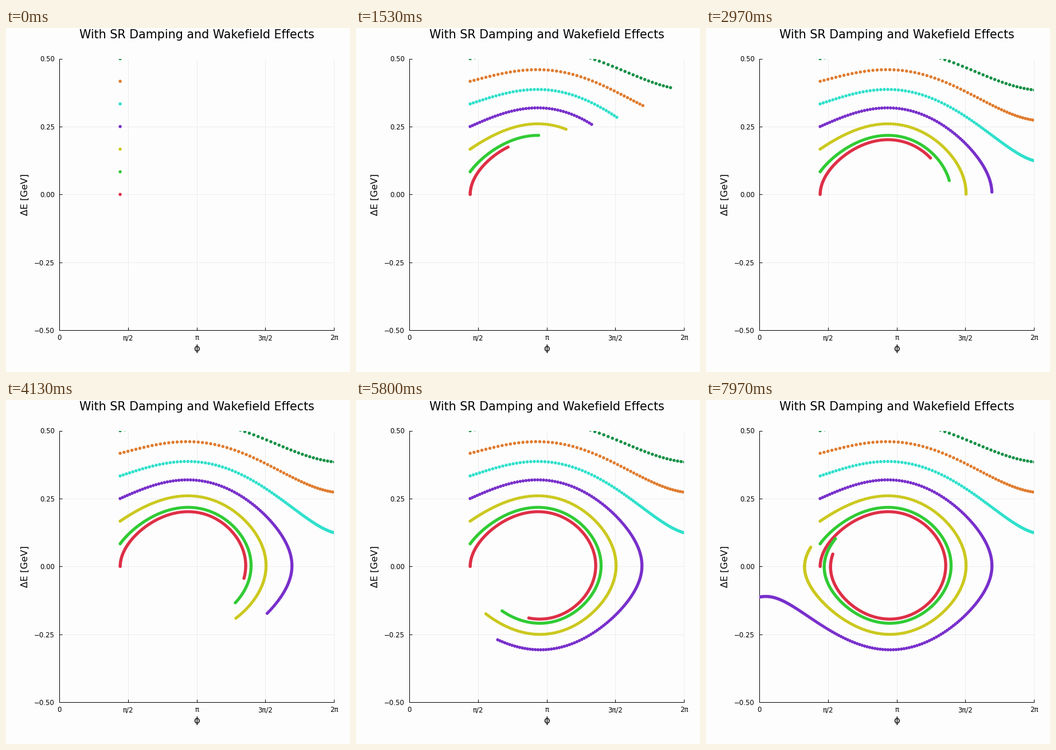
These frames come from a looping animation (600x600 px, 8 s). A matplotlib script:

```python
import numpy as np
import matplotlib.pyplot as plt
from matplotlib.animation import FuncAnimation

SIZE, DPI = 600, 100
FRAMES, LOOP_MS = 240, 8000
PAPER, INK, GRID = "#fdfdfd", "#000000", "#dedeea"
COLORS = ["#de2f46", "#30cb34", "#cbc81e", "#782fcb", "#2fe0cb", "#e07c2f", "#159046"]

# Ring: energies in GeV, phases in rad
E_START, E_GAIN = 4.0, 0.0017
VOLTAGE, SIN_S = 0.00505, 0.178
SLIP = 0.2113 * E_START
DAMPING = 0.00097
PHI_START = 1.391


def track(turns):
    """Phase and energy offset of every particle, turn by turn."""
    energy = E_START
    de = np.linspace(0, 0.5, len(COLORS))
    phi = np.full(len(COLORS), PHI_START)
    path = [np.column_stack([phi, de])]
    for _ in range(turns - 1):
        de = (de + VOLTAGE * (np.sin(phi) - SIN_S)) * (1 - DAMPING)
        energy += E_GAIN
        phi = phi + SLIP / energy * de
        path.append(np.column_stack([phi, de]))
    return np.concatenate(path)


def px(n):
    """Pixels to points."""
    return n * 72 / DPI


path = track(FRAMES)

plt.rcParams["font.family"] = "DejaVu Sans"
fig = plt.figure(figsize=(SIZE / DPI, SIZE / DPI), dpi=DPI, facecolor=PAPER)
ax = fig.add_axes([93 / SIZE, 73 / SIZE, 479.3 / SIZE, 473.5 / SIZE], facecolor=PAPER)
ax.set(xlim=(0, 2 * np.pi), ylim=(-0.5, 0.5))
ax.spines[["top", "right"]].set_visible(False)
ax.spines[["left", "bottom"]].set_linewidth(px(1))

ax.set_xticks(np.arange(5) * np.pi / 2, ["0", "π/2", "π", "3π/2", "2π"])
ax.set_yticks(np.arange(-2, 3) / 4, ["−0.50", "−0.25", "0.00", "0.25", "0.50"])
ax.tick_params(direction="in", length=px(5), width=px(1), labelsize=px(11.8))
ax.tick_params(axis="x", pad=px(7))
ax.tick_params(axis="y", pad=px(8))

grid = dict(color=GRID, lw=px(1), ls=(0, (1, 1)), zorder=0.5, clip_on=False)
for k in range(1, 5):
    ax.axvline(k * np.pi / 2, **grid)
for k in (-1, 0, 1):
    ax.axhline(k / 4, **grid)


def label(x, y, text, size, **kw):
    fig.text(x / SIZE, 1 - y / SIZE, text, fontsize=px(size), color=INK, ha="center", **kw)


label(332.7, 18, "With SR Damping and Wakefield Effects", 20.7, va="baseline")
label(332.7, 564, "ϕ", 16.3, va="baseline")
label(33, 290.5, "ΔE [GeV]", 16.3, va="center", rotation=90)

dots = ax.scatter([], [], s=px(5.5) ** 2, linewidths=0, zorder=3)
dots.set_facecolors(COLORS)  # cycles through the particles of each turn


def draw(i):
    dots.set_offsets(path[: (i + 1) * len(COLORS)])
    return [dots]


anim = FuncAnimation(fig, draw, frames=FRAMES, init_func=lambda: draw(0),
                     interval=LOOP_MS / FRAMES, repeat=True, repeat_delay=0)
plt.show()
```
